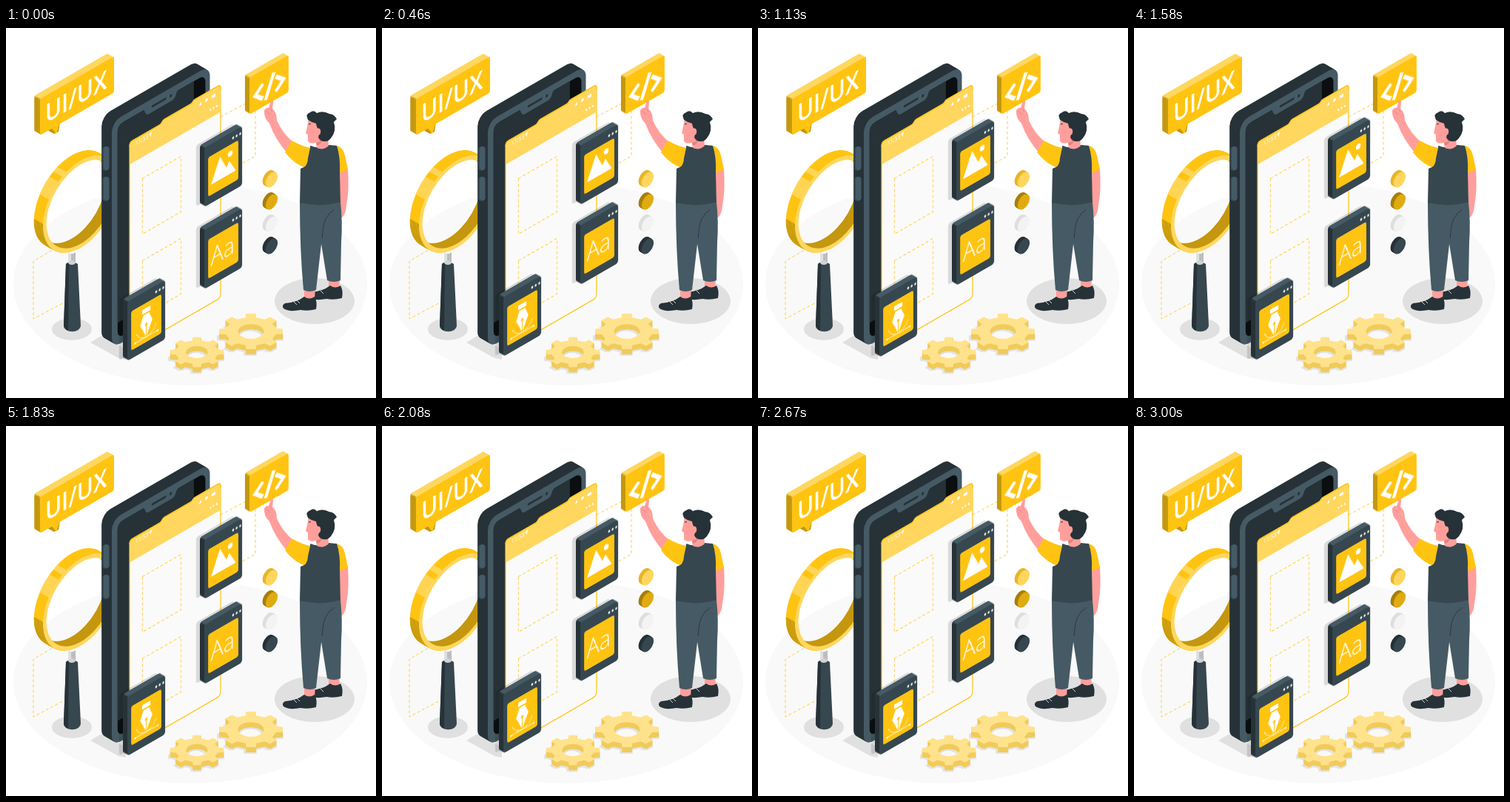
These frames come from a looping animation (500 px wide and 500 px high, 3040 ms). An HTML page:

```html
<!DOCTYPE html>
<html lang="en">
<head>
<meta charset="utf-8">
<title>UI/UX design</title>
<style>
html, body { margin: 0; width: 100%; height: 100%; overflow: hidden; background: #fff; }
svg { display: block; width: 100vw; height: 100vh; }
.float { animation: float 1520ms linear infinite; }
.slow { animation-duration: 3040ms; }
@keyframes float { 50% { transform: translateY(-10px); } }
text { fill: #fff; font-family: "Open Sans", "Noto Sans", sans-serif; }
.dash { fill: none; stroke: #ffc727; stroke-width: .9; stroke-dasharray: 4 3; }
.line { fill: none; stroke: #fff; }
</style>
</head>
<body>
<svg id="stage" viewBox="0 0 500 500"></svg>
<script>
const YELLOW = '#ffc412', GOLD = '#c4970f', PALE = '#ffd75e';
const INK = '#263238', SLATE = '#37474f', STEEL = '#455a64', SKIN = '#ff9f9c';
const C = .866;
let gradients = '', gradientCount = 0;

const path = (d, fill, extra = '') => `<path d="${d}" fill="${fill}" ${extra}/>`;
const oval = (x, y, rx, ry, fill) => `<ellipse cx="${x}" cy="${y}" rx="${rx}" ry="${ry}" fill="${fill}"/>`;
const rect = (x, y, w, h, r, fill, extra = '') =>
  `<rect x="${x}" y="${y}" width="${w}" height="${h}" rx="${r}" fill="${fill}" ${extra}/>`;

// Upright isometric plane with its origin at x, y
const iso = (x, y, body) => `<g transform="matrix(${C} -.5 0 1 ${x} ${y})">${body}</g>`;

function sideFill(side, top, edge) {
  const id = 'g' + gradientCount++;
  gradients += `<linearGradient id="${id}"><stop offset="${edge}" stop-color="${side}"/>` +
    `<stop offset="${edge * 1.8}" stop-color="${top}"/></linearGradient>`;
  return `url(#${id})`;
}

// Rounded slab whose depth runs back to the upper left
function slab(w, h, r, depth, front, side, top) {
  const fill = sideFill(side, top, .35 * r / w);
  let out = '';
  for (let k = depth; k > 0; k--) out += rect(-k, -k, w, h, r, fill);
  return out + rect(0, 0, w, h, r, front);
}

function card(x, y, icon, cls) {
  const dots = [45, 50.5, 56].map(u => oval(u, 9, 1.4, 1.7, '#fff')).join('');
  return `<g class="float ${cls}">` + iso(x, y,
    rect(-12.8, -9.9, 59, 83, 4, '#000', 'opacity=".13"') +
    slab(59, 80, 4, 7, SLATE, INK, STEEL) + dots +
    rect(6, 16, 47, 53, 3, YELLOW) + icon) + '</g>';
}

function disc(y, front, side) {
  let out = '';
  for (let k = 5; k > 0; k--) out += oval(-k, -k, 9.4, 9.4, side);
  return iso(359, y, out + oval(0, 0, 9.4, 9.4, front));
}

const ring = r => `M${-r} 0a${r} ${r} 0 1 0 ${2 * r} 0a${r} ${r} 0 1 0 ${-2 * r} 0z`;

function gear(cx, cy, rx, teeth) {
  const step = 2 * Math.PI / teeth, pts = [];
  for (let i = 0; i < teeth; i++)
    for (const [a, r] of [[-.27, .79], [-.19, 1], [.19, 1], [.27, .79]]) {
      const t = (i + a) * step;
      pts.push((rx * r * Math.cos(t)).toFixed(1) + ' ' + (rx * r * .56 * Math.sin(t)).toFixed(1));
    }
  const hole = rx * .4, ry = hole * .56;
  const d = `M${pts.join('L')}zM${-hole} 0a${hole} ${ry} 0 1 0 ${2 * hole} 0a${hole} ${ry} 0 1 0 ${-2 * hole} 0z`;
  const layer = (dx, dy, fill) =>
    path(d, fill, `fill-rule="evenodd" transform="translate(${cx + dx} ${cy + dy})"`);
  let out = layer(-3, 9, '#e3e3e3') + layer(1, 9, '#e3e3e3');
  for (let k = 7; k > 0; k--) out += layer(0, k, '#f0cb5c');
  return out + layer(0, 0, '#ffe28c');
}

function floor() {
  return oval(249, 346, 239, 137, '#f9f9f9') +
    path('M114 425L129 416L162 434V448L152 446Z', '#e0e0e0') +
    oval(89, 407, 27, 15, '#e0e0e0') + oval(417, 369, 54, 31, '#e0e0e0') +
    '<path class="dash" d="M80 290L37 315V393L82 369M290 120L337 95V173L319 183"/>';
}

function magnifier() {
  const hoop = ring(59) + ring(53.5);
  const band = (from, sweep, colour) =>
    `<circle r="56.3" fill="none" stroke="${colour}" stroke-width="5.4" pathLength="360" ` +
    `stroke-dasharray="${sweep} ${360 - sweep}" stroke-dashoffset="${-from}"/>`;
  const layer = path(hoop, 'url(#hoop)', 'fill-rule="evenodd"') +
    band(136, 46, GOLD) + band(212, 22, PALE) + band(241, 7, PALE);
  let body = '';
  for (let k = 14; k > 0; k--) body += `<g transform="translate(${-k} ${-k})">${layer}</g>`;
  return iso(101, 238, body + path(hoop, PALE, 'fill-rule="evenodd"')) +
    path('M84 304Q89 307 94 303V320H84Z', '#bdbdbd') + path('M84 304L88 306V320H84Z', '#e0e0e0') +
    path('M81 319Q89 312 97 319L101 402C100 413 79 413 78 402Z', SLATE) +
    path('M81 319Q82 317 85 317L84 409Q78 407 78 402Z', INK) +
    oval(89, 317, 5, 3, '#cfd3d5');
}

function phone() {
  const button = y => rect(130, y, 9, 33, 4.5, SLATE) + rect(132, y, 7.5, 32, 3.7, STEEL);
  return iso(143, 127,
    slab(153, 306, 14, 16, STEEL, INK, INK) +
    rect(9, 9, 137, 288, 9, '#0b0f11') +
    path('M9 18Q9 9 18 9H128V276H9Z', INK) +
    path('M46 8H106Q101 9 100 13T94 18H58Q53 18 52 13T46 8Z', STEEL) +
    rect(62, 9, 23, 3, 1.5, INK) + oval(92, 10.5, 2, 2, INK)) +
    button(160) + button(201);
}

function sheet() {
  const top = 'M0 30V5Q0 0 4 0H47C51 0 50 -4 54 -4H95C99 -4 98 -7 102 -7H138Q142 -7 142 -1V30';
  const dots = [126, 131, 136].map(u => oval(u, 19, 1.2, 1.4, '#fff')).join('');
  return iso(167, 154.5,
    path(top + 'V275Q142 281 137 281H5Q0 281 0 276Z', '#fafafa', `stroke="${YELLOW}" stroke-width="1.4"`) +
    path(top + 'Z', PALE) +
    path(top.replace('M0 30V5', 'M0 5').replace('V30', ''), 'none', `stroke="${YELLOW}" stroke-width="1.4"`) +
    '<text x="9" y="9" font-size="8">11:53</text>' +
    path('M30 5L35 2L33 9L32 6Z', '#fff') +
    path('M108 5L112 1V5Z', '#fff') + oval(120, 3, 2.2, 2, '#fff') + rect(128, 1, 6, 4, 1, '#fff') + dots +
    '<path class="dash" d="M20 59H80V134H20ZM20 170H80V245H20Z"/>');
}

function sign() {
  return path('M54 137L65 143L71 140L74 122Z', GOLD) + path('M61 134L68 143L74 124Z', YELLOW) +
    iso(46, 96, slab(115.5, 49, 3, 9, YELLOW, GOLD, PALE) +
      '<text x="8" y="37" font-size="34.5" font-weight="600">UI/UX</text>');
}

function codeBlock() {
  return iso(329, 67, slab(61, 50, 3, 7, YELLOW, GOLD, PALE) +
    '<path class="line" stroke-width="5.4" d="M21 19L9 29L21 39M38 12L25 43M41 19L53 29L41 39"/>');
}

function man() {
  const shoe = 'M403 363Q410 368 417 363Q421 370 419 380Q408 383 398 381Q382 384 375 379Q372 375 377 372Q393 371 403 363Z';
  return path('M436 339H451L450 353H436Z', SKIN) +
    path(shoe, INK, 'transform="translate(35 -15)"') +
    path('M403 350H418L417 368Q410 371 403 366Z', SKIN) + path(shoe, INK) +
    '<path class="line" stroke-width=".8" d="M389 370L393 374M393 368L397 372M425 355L429 359"/>' +
    path('M450 193L462 190Q464 220 460 240Q459 253 453 257Q450 250 452 238Z', SKIN) +
    path('M446 159Q455 160 458 172L462 191Q456 196 449 195Z', YELLOW) +
    path('M427 235H452Q455 262 453 290L452 341Q443 345 434 341L425 285Z', STEEL) +
    path('M397 234H450Q447 260 428 275L419 354Q410 358 402 354Q397 300 397 234Z', STEEL) +
    path('M427 284L428 275Q429 254 444 245', 'none', `stroke="${INK}" stroke-width=".8"`) +
    path('M349 111Q352 107 355 108L358 98Q361 97 361 101L360 109Q366 114 366 125Q374 143 390 156L380 169Q364 151 356 129Q348 122 349 111Z', SKIN) +
    path('M352 113L358 117M356 108L360 113', 'none', 'stroke="#e58280" stroke-width=".8"') +
    path('M386 152Q400 160 412 162L407 190Q389 184 377 168Z', YELLOW) +
    path('M411 159Q424 164 436 158L447 159Q452 174 451 195L452 235Q425 243 397 236L398 190Q408 188 408 176L411 162Z', SLATE) +
    path('M409 122L407 134L405 142L408 144L408 153Q411 157 419 155L420 162Q429 166 436 159L435 145L428 122Z', SKIN) +
    path('M419 155Q424 154 427 150Q427 157 420 159Z', '#e58280') +
    path('M408 124Q404 116 411 114Q416 110 420 115Q428 111 437 116Q443 116 447 123L443 127Q447 139 439 149Q435 154 431 153Q425 154 422 148L424 139Q420 136 419 129Q413 128 408 124Z', INK) +
    oval(422, 140, 3.2, 4.5, SKIN) +
    path('M409 130L412 129.5', 'none', `stroke="${INK}" stroke-width="1"`);
}

const mountains = path('M10.5 55L24.5 24L34.5 44L39 37L49 55Z', '#fff') + oval(40.5, 28, 3.7, 3.7, '#fff');
const letters = '<text x="10" y="54" font-size="33" font-weight="300">Aa</text>';
const nib = rect(23, 23, 13, 6, 1, '#fff') + path('M25 31H34L39 43Q35 50 29.5 62Q24 50 20 43Z', '#fff') +
  path('M29.5 45V62', 'none', `stroke="${YELLOW}" stroke-width="1.1"`) + oval(29.5, 45, 2, 2, YELLOW) +
  '<path class="line" stroke-width=".8" d="M12 62H47M14 51Q18 61 29.5 62Q41 61 45 51"/>' +
  rect(11, 61, 2.4, 2.4, 0, '#fff') + rect(46, 61, 2.4, 2.4, 0, '#fff');

const scene = floor() + magnifier() + phone() + sheet() + sign() +
  gear(331, 410, 43.5, 8) + gear(258, 438, 36.5, 8) +
  disc(205, PALE, '#e8b62a') + disc(235, '#e0ab10', '#a87f0a') +
  disc(265, '#f3f3f3', '#dedede') + disc(295, SLATE, INK) +
  card(268, 162, mountains, 'slow') + card(268, 273, letters, '') + card(164, 370, nib, '') +
  codeBlock() + man();

gradients += `<linearGradient id="hoop" x1="0" y1="0" x2="1" y2="1"><stop offset=".5" stop-color="${YELLOW}"/>` +
  `<stop offset=".52" stop-color="${GOLD}"/></linearGradient>`;
document.getElementById('stage').innerHTML = `<defs>${gradients}</defs>${scene}`;
</script>
</body>
</html>
```
